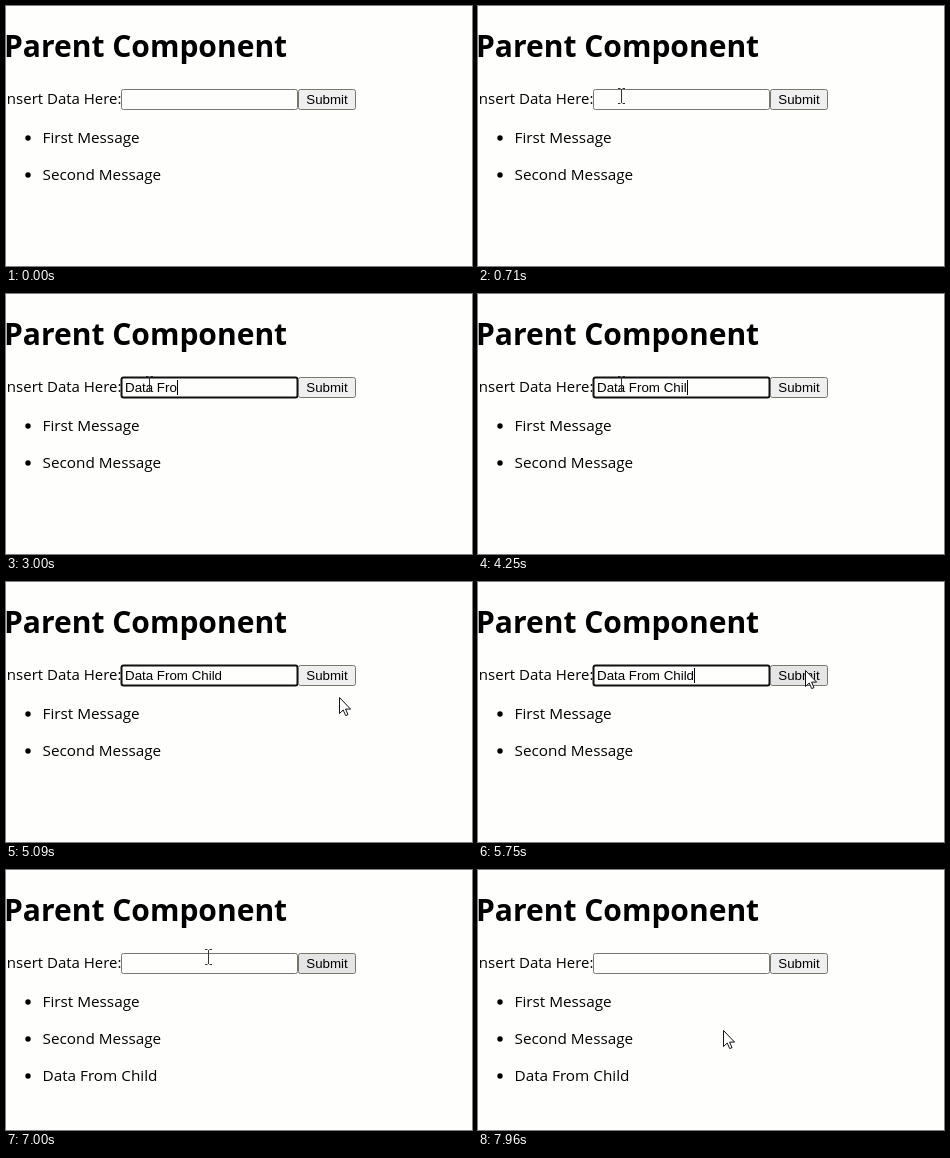
Write an HTML page that moves like this. It is 466x260 px and loops after 8 s.

```html
<!DOCTYPE html>
<html lang="en">
<head>
<meta charset="utf-8">
<title>Parent Component</title>
<style>
  html, body { margin: 0; width: 100%; height: 100%; overflow: hidden; background: #fefefd; }
  svg { display: block; }
  text { white-space: pre; fill: #000; font: 15.3px "Open Sans", "Noto Sans", sans-serif; }
  .title { font-size: 30px; font-weight: 700; }
  .label { font-size: 15px; text-anchor: end; }
  .control { font: 13.333px "Liberation Sans", Arial, sans-serif; }
  .mid { text-anchor: middle; }
  #field { fill: #fefefd; stroke: #767670; }
  #field.focused { stroke: #101010; stroke-width: 2; }
  #button { fill: #efefef; stroke: #767670; }
  #button.hover { fill: #e5e5e5; }
</style>
</head>
<body>
<svg width="466" height="260" viewBox="0 0 466 260">
  <text class="title" x="-2" y="51">Parent Component</text>
  <text class="label" x="115.5" y="98">Insert Data Here:</text>

  <rect id="field" x="115.5" y="83.5" width="176" height="20" rx="2"/>
  <text id="value" class="control" x="119" y="98"></text>
  <rect id="caret" y="86" width="1" height="15"/>

  <rect id="button" x="292.5" y="83.5" width="57" height="20" rx="2"/>
  <text class="control mid" x="321" y="98">Submit</text>

  <circle cx="22" cy="132" r="2.7"/><text x="36.5" y="137">First Message</text>
  <circle cx="22" cy="169" r="2.7"/><text x="36.5" y="174">Second Message</text>
  <g id="added"><circle cx="22" cy="206" r="2.7"/><text x="36.5" y="211">Data From Child</text></g>

  <path id="arrow" d="M.5 .5V16.5L4.2 13L6.7 18.6L9 17.6L6.6 12.1H11.6Z" fill="#fff" stroke="#111"/>
  <path id="beam" d="M-3 -7.5H-.5M1.5 -7.5H4M.5 -7V7M-3 7.5H-.5M1.5 7.5H4" fill="none" stroke="#333"/>
</svg>
<script>
const LOOP = 8000, ENTER = 420, FOCUS = 1000, SUBMIT = 5790;
const HOVER = 5460, HOVER_END = 7460;

// Words come at a steady pace, with even keystrokes inside each
const words = ["Data", " From", " Child"];
const FIRST_WORD = 1280, WORD_GAP = 1190, KEY_GAP = 135;

const $ = id => document.getElementById(id);
const [field, value, caret, button, added, arrow, beam] =
  ["field", "value", "caret", "button", "added", "arrow", "beam"].map($);

function show(el, on) {
  el.style.visibility = on ? "visible" : "hidden";
}

function typing(t) {
  let text = "", lastKey = FOCUS;
  words.forEach((word, i) => {
    const begin = FIRST_WORD + i * WORD_GAP;
    if (t < begin) return;
    const count = Math.min(word.length, Math.floor((t - begin) / KEY_GAP) + 1);
    text += word.slice(0, count);
    lastKey = begin + (count - 1) * KEY_GAP;
  });
  return { text, lastKey };
}

function pointerAt(t) {
  let x = 190, y = 150;
  const glide = (start, end, toX, toY) => {
    const k = Math.min(1, Math.max(0, (t - start) / (end - start)));
    const eased = k * k * (3 - 2 * k);
    x += (toX - x) * eased;
    y += (toY - y) * eased;
  };
  glide(ENTER, 700, 143, 90);
  glide(4670, 5080, 333, 115);
  glide(5200, HOVER, 327, 88);
  glide(6540, 6980, 202, 87);
  glide(7840, 7960, 245, 160);
  return [Math.round(x), Math.round(y)];
}

function drawPointer(t) {
  const [x, y] = pointerAt(t);
  const inField = x > 115 && x < 292 && y > 83 && y < 104;
  show(arrow, t >= ENTER && !inField);
  show(beam, t >= ENTER && inField);
  (inField ? beam : arrow).setAttribute("transform", `translate(${x} ${y})`);
}

function drawField(t) {
  const focused = t >= FOCUS && t < SUBMIT;
  const { text, lastKey } = typing(t);
  field.classList.toggle("focused", focused);
  value.textContent = focused ? text : "";

  // The blink restarts with every key
  show(caret, focused && (t - lastKey) % 1000 < 500);
  caret.setAttribute("x", Math.round(119 + value.getComputedTextLength()));
}

function draw(t) {
  drawField(t);
  button.classList.toggle("hover", t >= HOVER && t < HOVER_END);
  show(added, t >= SUBMIT);
  drawPointer(t);
}

const start = performance.now();
function tick() {
  draw((performance.now() - start) % LOOP);
  requestAnimationFrame(tick);
}
tick();
</script>
</body>
</html>
```
